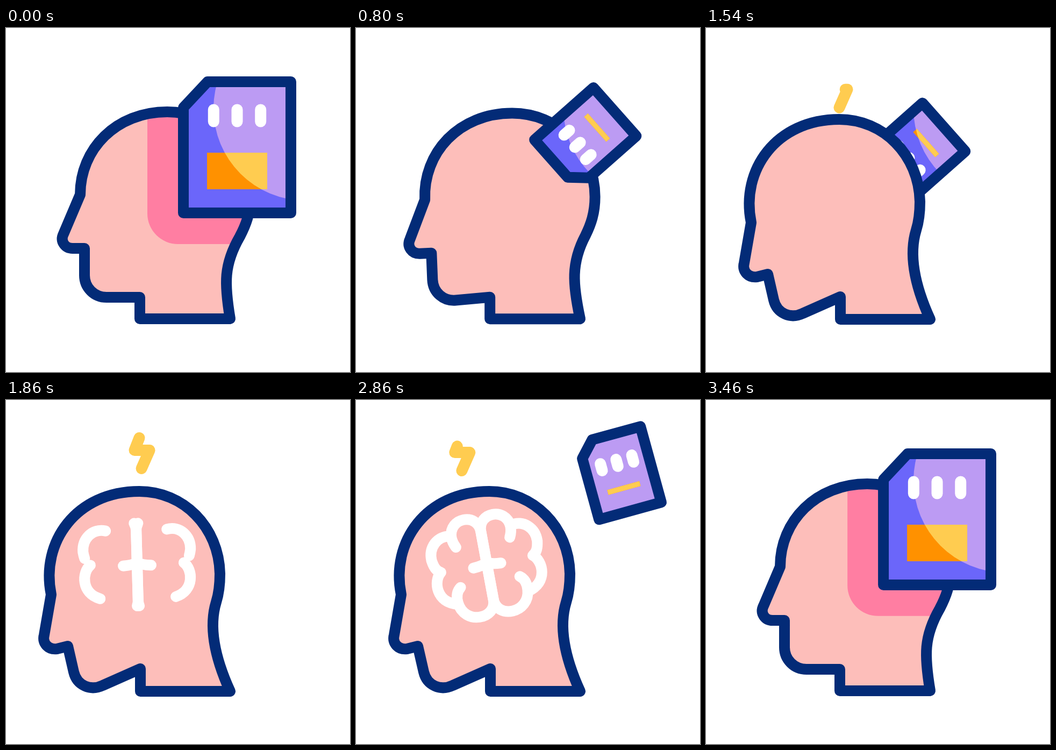
Write an HTML page with a canvas that moves like this. It is 640 px wide and 640 px high and loops after 3.6 s.

```html
<!DOCTYPE html>
<html lang="en">
<head>
<meta charset="utf-8">
<title>Memory card</title>
<style>
html, body { margin: 0; width: 100%; height: 100%; overflow: hidden; background: #fff; }
canvas { display: block; width: 640px; height: 640px; }
</style>
</head>
<body>
<canvas id="stage" width="640" height="640"></canvas>
<script>
const ctx = document.getElementById('stage').getContext('2d');
const LOOP = 3600;
const NAVY = '#032b77', SKIN = '#fdbeba', PINK = '#ff7ea2', BLUE = '#6b66fa',
      LILAC = '#bc9bf3', ORANGE = '#ff9100', YELLOW = '#ffcc50', WHITE = '#fff';

const mix = (a, b, p) => a + (b - a) * p;
const mixPt = (a, b, p) => [mix(a[0], b[0], p), mix(a[1], b[1], p)];
const ease = (t, from, to) => {
  const u = Math.min(1, Math.max(0, (t - from) / (to - from)));
  return u * u * (3 - 2 * u);
};

// Head outline: upright and bowed; letters tell how the points are used.
const HEAD_OPS = 'MLLLCLLCLCCCC';
const UPRIGHT = [
  417, 541, 249, 541, 249, 501, 187, 501, 164, 501, 146, 483, 146, 460,
  146, 410, 124, 410, 110, 410, 100, 397, 107, 383, 138, 310,
  138, 225, 205, 156, 300, 156, 386, 156, 455, 224, 455, 312,
  455, 345, 446, 367, 435, 388, 405, 440, 406, 475, 417, 541];
const BOWED = [
  417, 542, 250, 542, 250, 500, 180, 531, 157, 542, 132, 531, 126, 506,
  115, 458, 95, 463, 79, 465, 67, 453, 71, 437, 84, 362,
  64, 265, 130, 170, 248, 170, 330, 170, 396, 236, 398, 323,
  398, 343, 396, 360, 391, 376, 376, 425, 391, 485, 417, 542];

function headPath(p) {
  const path = new Path2D();
  let i = 0;
  const next = n => {
    const part = [];
    while (n--) { part.push(mix(UPRIGHT[i], BOWED[i], p)); i++; }
    return part;
  };
  for (const op of HEAD_OPS) {
    if (op === 'M') path.moveTo(...next(2));
    else if (op === 'L') path.lineTo(...next(2));
    else path.bezierCurveTo(...next(6));
  }
  path.closePath();
  return path;
}

const halfBrain = new Path2D(
  'M0 0V-64C0 -101 54 -101 56 -64C56 -56 54 -50 51 -44' +
  'M57 -66C82 -72 101 -52 100 -28C98 -14 95 -8 87 -3' +
  'M87 -3C104 10 106 52 66 61' +
  'M0 -4V64C0 102 62 102 66 58C67 45 63 36 56 31' +
  'M0 -6Q8 -1 26 0');

const glow = new Path2D();
glow.arc(557, 150, 171, 0, Math.PI * 2);

function polygon(points) {
  const path = new Path2D();
  points.forEach(p => path.lineTo(...p));
  path.closePath();
  return path;
}

function stroke(path, color, width) {
  ctx.strokeStyle = color;
  ctx.lineWidth = width;
  ctx.stroke(path);
}

function fill(path, color) {
  ctx.fillStyle = color;
  ctx.fill(path);
}

function within(path, draw) {
  ctx.save();
  ctx.clip(path);
  draw();
  ctx.restore();
}

function cardState(t) {
  let center, deg, size, label, shade;
  if (t < 2100) {
    const lifted = mixPt([430, 222], [410, 214.5], ease(t, 220, 620));
    const away = mixPt(lifted, [503, 159], ease(t, 640, 1235));
    center = mixPt(away, [250, 321.5], ease(t, 1350, 1756));
    deg = -131.5 * ease(t, 220, 778);
    size = 1 - 0.4 * ease(t, 220, 670);
    label = ease(t, 220, 630);
    shade = 1 - ease(t, 420, 820);
  } else {
    const back = ease(t, 2886, 3470);
    const out = mixPt([250, 321.5], [493, 134], ease(t, 2450, 2886));
    center = mixPt(out, [430, 222], back);
    deg = -15.4 * (1 - back);
    size = 0.6 + 0.4 * back;
    label = 1 - back;
    shade = back;
  }
  const a = deg * Math.PI / 180, cos = Math.cos(a), sin = Math.sin(a);
  const at = (x, y) => [center[0] + x * cos - y * sin, center[1] + x * sin + y * cos];
  const scaled = (x, y) => at(x * size, y * size);
  return { at, scaled, size, label, shade };
}

function drawCard({ at, scaled, size, label }) {
  const body = polygon([
    scaled(-55, -122), scaled(100, -122), scaled(100, 122), scaled(-100, 122), scaled(-100, -74)]);
  const w = mix(56, 31, label), top = mix(10, 24.3, label), bottom = mix(78, 33.7, label);
  const tag = polygon([at(-w, top), at(w, top), at(w, bottom), at(-w, bottom)]);
  fill(body, BLUE);
  within(body, () => fill(glow, LILAC));
  fill(tag, ORANGE);
  within(glow, () => fill(tag, YELLOW));

  const shrink = (1 - size) / 0.4;
  const gap = mix(43.7, 30.3, shrink), y = mix(-59, -19.5, shrink), half = 11 * size;
  for (const n of [-1, 0, 1]) {
    const pin = new Path2D();
    pin.moveTo(...at(n * gap, y - half));
    pin.lineTo(...at(n * gap, y + half));
    stroke(pin, WHITE, 21);
  }
  stroke(body, NAVY, 20);
}

function drawShade({ scaled, size, shade: k }) {
  const left = -100 - 67 * k + (1 - size) * 28 * k, low = 122 + 58 * k;
  const path = new Path2D();
  path.moveTo(...scaled(-55 - 22 * k, -122 - 77 * k));
  path.lineTo(...scaled(100 + 60 * k, -122 - 77 * k));
  path.lineTo(...scaled(100 + 60 * k, low));
  path.arcTo(...scaled(left, low), ...scaled(left, -74), 57 * k * size);
  path.lineTo(...scaled(left, -74 - 13 * k));
  path.closePath();
  fill(path, PINK);
}

function drawBrain(t) {
  const shown = ease(t, 1700, 2080) * (1 - ease(t, 2860, 3100));
  if (shown < 0.01) return;
  const deg = mix(-15 * ease(t, 1760, 2260), -10.5, ease(t, 2300, 2860));
  ctx.save();
  ctx.translate(244, 308);
  ctx.rotate(deg * Math.PI / 180);
  if (shown < 1) ctx.setLineDash([205 * shown, 999]);
  stroke(halfBrain, WHITE, 20);
  ctx.scale(-1, 1);
  stroke(halfBrain, WHITE, 20);
  ctx.restore();
}

function drawBolt(t) {
  const shown = ease(t, 1400, 1700) * (1 - ease(t, 2800, 3060));
  if (shown < 0.01) return;
  const deg = mix(mix(2.9, 21.2, ease(t, 1800, 2260)), -12.3, ease(t, 2300, 2860));
  const a = deg * Math.PI / 180;
  const r = mix(177, 198, ease(t, 1540, 1800));
  ctx.save();
  ctx.translate(239 + r * Math.sin(a), 325 - r * Math.cos(a));
  if (shown < 1) ctx.setLineDash([90 * shown, 999]);
  stroke(new Path2D('M0 0L15 -34H-13L-4 -57'), YELLOW, 21);
  ctx.restore();
}

function draw(t) {
  ctx.fillStyle = WHITE;
  ctx.fillRect(0, 0, 640, 640);
  ctx.lineCap = ctx.lineJoin = 'round';
  const card = cardState(t);
  const head = headPath(ease(t, 640, 1230) * (1 - ease(t, 2886, 3470)));
  const behind = t > 1100 && t < 2890;

  if (behind) drawCard(card);
  fill(head, SKIN);
  if (!behind && card.shade > 0) within(head, () => drawShade(card));
  drawBrain(t);
  stroke(head, NAVY, 20);
  drawBolt(t);
  if (!behind) drawCard(card);
}

const start = performance.now();
function tick() {
  draw((performance.now() - start) % LOOP);
  requestAnimationFrame(tick);
}
tick();
</script>
</body>
</html>
```
